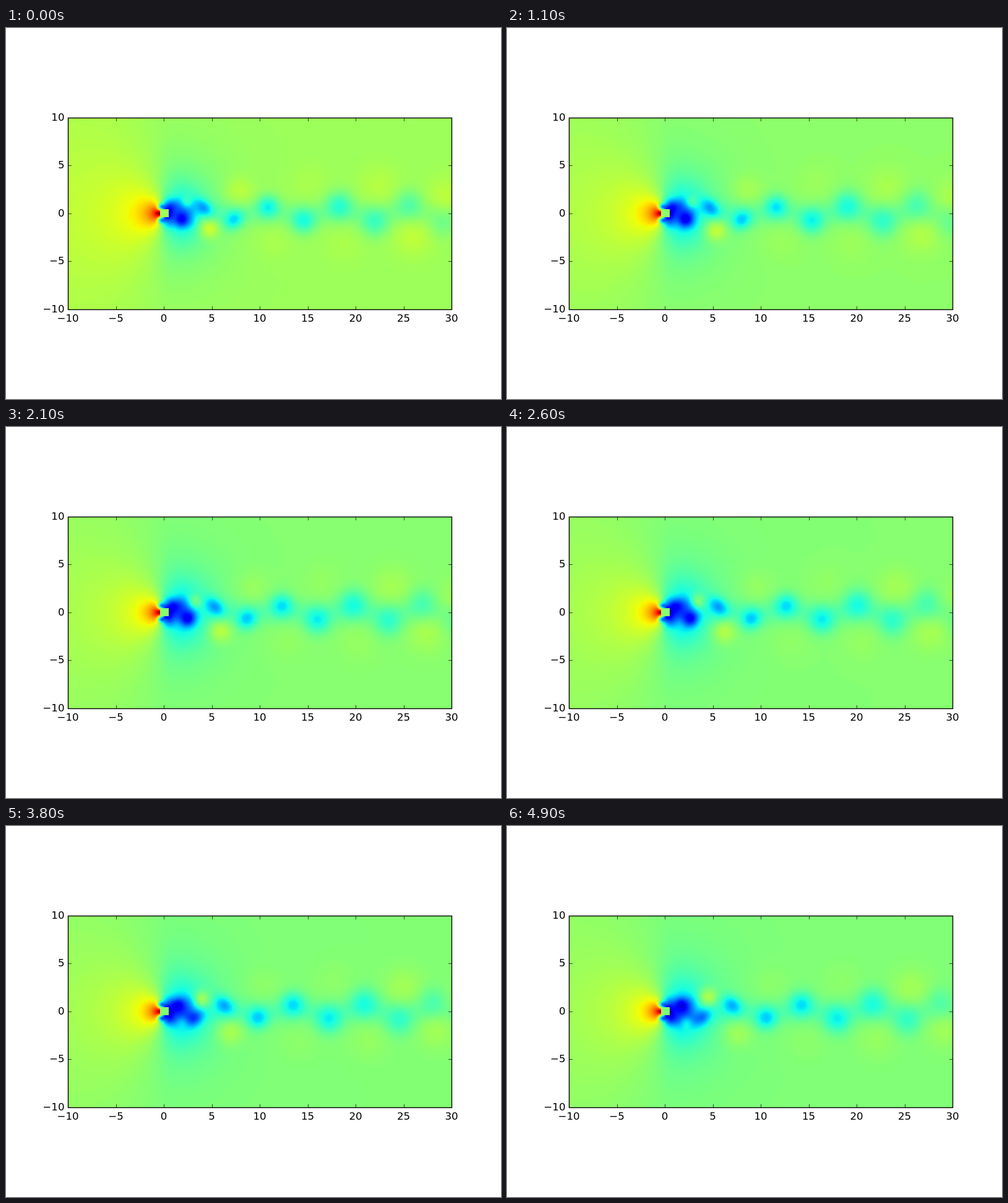
Animation of 800 by 600 pixels, one loop 5 s. Source, as an HTML page with a canvas:

```html
<!DOCTYPE html>
<html lang="en">
<head>
<meta charset="utf-8">
<title>Vortex street</title>
<style>
html, body { margin: 0; width: 100%; height: 100%; overflow: hidden; background: #fff; }
canvas { display: block; }
</style>
</head>
<body>
<canvas id="stage" width="800" height="600"></canvas>
<script>
const ctx = document.getElementById('stage').getContext('2d');
const LEFT = 100, TOP = 145, W = 620, H = 310, UNIT = 15.5;
const LOOP = 5000, STEP = 100, SHED = 5.35;

const clamp = (v, lo, hi) => Math.min(hi, Math.max(lo, v));
const bell = (v, mid, width) => Math.exp(-(((v - mid) / width) ** 2));
const smooth = v => { const e = clamp(v, 0, 1); return e * e * (3 - 2 * e); };

// Jet colours: each channel rises from a to b and falls from c to d.
const hump = (v, a, b, c, d) =>
  Math.round(255 * clamp(Math.min((v - a) / (b - a), (d - v) / (d - c)), 0, 1));
const palette = Array.from({ length: 256 }, (_, i) => {
  const v = i / 255;
  return [
    hump(v, .35, .66, .89, 1.11),
    hump(v, .125, .375, .64, .91),
    hump(v, -.11, .11, .34, .65)
  ];
});
const colour = v => palette[clamp(Math.floor(v * 256), 0, 255)];

const toX = px => (px + .5) / UNIT - 10;
const toY = py => 10 - (py + .5) / UNIT;

function addBlob(field, x, y, amp, size, skew = 0) {
  const reach = 4 * size;
  const x0 = Math.max(0, Math.floor((x - reach + 10) * UNIT));
  const x1 = Math.min(W, Math.ceil((x + reach + 10) * UNIT));
  const y0 = Math.max(0, Math.floor((10 - y - reach) * UNIT));
  const y1 = Math.min(H, Math.ceil((10 - y + reach) * UNIT));
  const k = -.5 / (size * size);
  for (let j = y0; j < y1; j++) {
    const dy = toY(j) - y;
    for (let i = x0; i < x1; i++) {
      const dx = toX(i) - x;
      field[j * W + i] += amp * Math.exp(k * (dx * dx + dy * dy + 2 * skew * dx * dy));
    }
  }
}

// Steady part: stagnation pressure, suction around and behind the body, wake band.
function steady(x, y) {
  const d = x - 2;
  const front = -.4 * x / (x * x + y * y + .12) * (x > 0 ? Math.exp(-1.2 * x) : 1);
  const suction = -.2 / Math.pow(1 + d * d / (d < 0 ? 3.6 : 9) + y * y / 14, 1.5);
  const core = -.11 * Math.exp(-(((x - 1.4) / 1.8) ** 4) - (y / 1.5) ** 4);
  const band = -.05 * smooth((x - 3) / 3) * (1 - x / 75) * bell(y, 0, 1.27);
  return front + suction + core + band;
}

const base = new Float32Array(W * H);
for (let j = 0; j < H; j++)
  for (let i = 0; i < W; i++) base[j * W + i] = steady(toX(i), toY(j));
for (const side of [1, -1]) addBlob(base, -.3, side * .65, -.32, .25);

// One vortex and the weak high-pressure patch across the wake from it.
// Age counts shedding half periods; the vortex speeds up as it leaves the body.
function addVortex(field, age, side) {
  const x = 3 * Math.log(1 + Math.exp((age + .88) / .8)) - .06 * Math.max(0, age - 4) ** 2;
  const y = .6 + .08 * Math.abs(age);
  const depth = .15 * clamp((age + 3.5) / 3, 0, 1) * Math.max(0, 1 - ((age - .5) / 8) ** 2);
  const size = clamp(.6 + .1 * age, .45, 1.05);
  addBlob(field, x, side * y, -depth, size, .35 * side * bell(age, .3, 1));

  const far = Math.max(1.1, 3.1 - .13 * (age - 3.5) ** 2);
  const height = .015 * smooth(age + 2) + .13 * bell(age, -.4, 1.2) + .025 * smooth((age - 4) / 2);
  addBlob(field, x + .5, -side * far, height, clamp(.75 + .35 * age, .45, 1.5));
}

const field = new Float32Array(W * H);
const image = ctx.createImageData(W, H);

function drawField(t) {
  const zero = .505 + .037 * Math.exp(-t / 1.6);
  field.set(base);
  for (let n = -4; n < 8; n++) addVortex(field, n + t / SHED, n % 2 ? -1 : 1);
  const data = image.data;
  field.forEach((p, i) => {
    const [r, g, b] = colour(zero + p);
    data[4 * i] = r;
    data[4 * i + 1] = g;
    data[4 * i + 2] = b;
    data[4 * i + 3] = 255;
  });
  ctx.putImageData(image, LEFT, TOP);
  ctx.fillStyle = `rgb(${colour(zero)})`;
  ctx.fillRect(249, 293, 14, 13);
}

function line(x0, y0, x1, y1) {
  ctx.beginPath();
  ctx.moveTo(x0, y0);
  ctx.lineTo(x1, y1);
  ctx.stroke();
}

function drawAxes() {
  const l = LEFT + .5, t = TOP + .5, r = l + W, b = t + H, tick = 5.5;
  const label = v => String(v).replace('-', '\u2212');
  ctx.strokeStyle = ctx.fillStyle = '#000';
  ctx.font = '16.67px "DejaVu Sans", sans-serif';
  ctx.lineWidth = .7;
  ctx.textAlign = 'center';
  for (let v = -10; v <= 30; v += 5) {
    const x = LEFT + (v + 10) * UNIT, snap = Math.round(x) + .5;
    line(snap, b, snap, b - tick);
    line(snap, t, snap, t + tick);
    ctx.fillText(label(v), x, 475);
  }
  ctx.textAlign = 'right';
  for (let v = -10; v <= 10; v += 5) {
    const y = Math.floor(TOP + (10 - v) * UNIT);
    line(l, y + .5, l + tick, y + .5);
    line(r, y + .5, r - tick, y + .5);
    ctx.fillText(label(v), 94.5, y + 5);
  }
  ctx.lineWidth = 1.39;
  ctx.strokeRect(l, t, W, H);
}

let shown = -1;
const start = performance.now();

function tick() {
  const step = Math.floor((performance.now() - start) % LOOP / STEP);
  if (step !== shown) {
    shown = step;
    ctx.fillStyle = '#fff';
    ctx.fillRect(0, 0, 800, 600);
    drawField(step * STEP / 1000);
    drawAxes();
  }
  requestAnimationFrame(tick);
}
tick();
</script>
</body>
</html>
```
